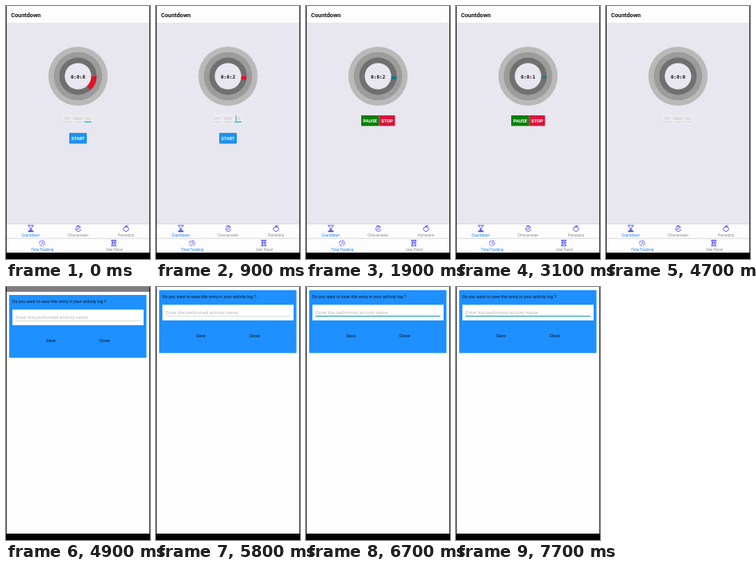
An HTML page that plays this animation: 180 px wide and 317 px high, repeating every 8000 ms.

```html
<!DOCTYPE html>
<html lang="en">
<head>
<meta charset="utf-8">
<title>Countdown</title>
<style>
  html, body { margin: 0; width: 100%; height: 100%; overflow: hidden; background: #000; }
  svg { display: block; width: 100vw; height: 100vh; font-family: Roboto, sans-serif; }
  .mid { text-anchor: middle; }
  .tab { font-size: 4.45px; text-anchor: middle; fill: #8c8c90; }
  .on { fill: #1f7cf0; }
  .btn { font-weight: 700; fill: #fff; text-anchor: middle; }
  .icon { fill: none; stroke: #3d3de6; stroke-width: .8; stroke-linecap: round; }
  .hint { font-size: 5.6px; fill: #c6c4ca; text-anchor: middle; }
  .digits { font: 700 6px "DejaVu Sans Mono", monospace; text-anchor: middle; fill: #111; }
</style>
</head>
<body>
<svg viewBox="0 0 180 317" preserveAspectRatio="none">
  <rect width="180" height="309" fill="#e8e6ee"/>
  <rect width="180" height="21" fill="#fdfdfd"/>
  <text x="6.2" y="13.7" font-size="7.3" font-weight="700" fill="#151515">Countdown</text>

  <circle cx="90" cy="88" r="37" fill="#b9b9b9"/>
  <circle cx="90" cy="88" r="30.3" fill="#9c9c9c"/>
  <circle cx="90" cy="88" r="23.4" fill="#707070"/>
  <circle cx="90" cy="88" r="16.6" fill="#e8e6ee"/>
  <path id="arc" fill="none" stroke-width="6.6"/>
  <text id="digits" class="digits" x="90" y="90.8"></text>

  <g id="fields">
    <path d="M71 135h12v13h-12zM84 135h12v13h-12zM97 135h12v13h-12z" fill="#ecebef"/>
    <text class="hint" x="76.7" y="143">HH</text>
    <text class="hint" x="90" y="143">MM</text>
    <text class="hint" x="102.2" y="143">SS</text>
    <path d="M72.5 145.3h9M85.500 145.3h9M98 145.3h9" stroke="#cbc9cf" stroke-width=".8"/>
    <g id="focus" stroke="#25a9b8">
      <path d="M98 145.3h9" stroke-width="1.1"/>
      <path id="caret" d="M100 136.500v8" stroke-width=".8"/>
    </g>
  </g>

  <g id="start">
    <rect x="79" y="159" width="22" height="13.500" rx="1" fill="#1e90f0"/>
    <text class="btn" x="90" y="167.900" font-size="5.500">START</text>
  </g>
  <g id="running">
    <rect x="69" y="137" width="22.300" height="13.300" fill="#068006"/>
    <rect x="91.300" y="137" width="20" height="13.300" fill="#dc143c"/>
    <text class="btn" x="80.200" y="145.800" font-size="5.700">PAUSE</text>
    <text class="btn" x="101.300" y="145.800" font-size="5.700">STOP</text>
  </g>

  <rect y="273" width="180" height="36" fill="#fdfdfd"/>
  <path d="M0 273h180M0 291.200h180" stroke="#c9c8ce" stroke-width=".7"/>
  <g class="icon">
    <path d="M27.500 275h7M27.500 282.700h7M28.500 275.300c0 2.500 2.500 2.500 2.500 3.600s-2.500 1.200-2.500 3.600M33.500 275.300c0 2.500-2.500 2.500-2.500 3.600s2.500 1.200 2.500 3.600"/>
    <path d="M29.300 282.300l1.700-2 1.700 2z" fill="#3d3de6"/>
    <path d="M93 277.300a3.200 3.200 0 1 0 .6 2.800M90.500 279.500l2.600-2.700M88.500 275.500h3M90.500 279.500h-1.500"/>
    <path d="M147.700 276.800a3.300 3.300 0 1 0 4.600 0M150 275v2.500M150 275.800l2.500-.6M148.500 277.500l1.500-1.300 1.500 1.300"/>
    <circle cx="45" cy="297" r="3.400" stroke-dasharray="3.600 1.700"/>
    <path d="M45 295.300v1.900h1.400"/>
    <path d="M131.700 293.500h6M132.500 293.500v5.500M137 293.500v5.500M131.700 300.500h6"/>
    <circle cx="134.700" cy="296" r="1.400"/>
    <path d="M132.700 300.300c0-3.200 4-3.200 4 0"/>
  </g>
  <text class="tab on" x="30.700" y="289">Countdown</text>
  <text class="tab" x="90" y="289">Chronometer</text>
  <text class="tab" x="150" y="289">Pomodoro</text>
  <text class="tab on" x="45.300" y="307.300">Time Tracking</text>
  <text class="tab" x="135.300" y="307.300">User Panel</text>

  <rect id="shade" width="180" height="309"/>
  <g id="sheet">
    <rect width="180" height="309" fill="#fefefe"/>
    <rect x="4" y="4" width="171.600" height="78.700" fill="#1e90ff"/>
    <text x="8" y="13.700" font-size="5.260" fill="#0b1626">Do you want to save this entry in your activity log ?:</text>
    <rect x="8" y="22.300" width="164" height="19.500" fill="#fefefe"/>
    <text x="12" y="34.200" font-size="6" fill="#b9b9bd">Enter the performed activity name</text>
    <path id="line" d="M12 36.500h156"/>
    <path id="cursor" d="M12.400 27.300v9" stroke="#1b9aaa" stroke-width=".9"/>
    <g class="mid" font-size="5.400" fill="#0b1626">
      <text x="56" y="62.700">Save</text>
      <text x="123.200" y="62.700">Close</text>
    </g>
  </g>

  <path d="M.5 0v309M179.500 0v309" stroke="#000" stroke-opacity=".75"/>
  <rect y="309" width="180" height="8"/>
</svg>
<script>
  const LOOP = 8000, STEP = 100;
  const el = id => document.getElementById(id);
  const show = (id, on) => el(id).setAttribute('visibility', on ? 'inherit' : 'hidden');
  const set = (id, attrs) => Object.entries(attrs).forEach(([k, v]) => el(id).setAttribute(k, v));
  const ramp = (t, a, b) => Math.min(1, Math.max(0, (t - a) / (b - a)));
  const mix = (a, b, k) => a.map((v, i) => Math.round(v + (b[i] - v) * k));

  // Seconds on the dial; each change eases over roughly half a second.
  const dial = t => 8 - 6 * ramp(t, 200, 900) - ramp(t, 2500, 3100) - ramp(t, 3500, 4000);
  const digit = t => t < 300 ? 8 : t < 2600 ? 2 : t < 3600 ? 1 : 0;

  function drawArc(t) {
    const r = 20, a = dial(t) * Math.PI / 30;
    const x = 90 + r * Math.cos(a), y = 88 + r * Math.sin(a);
    const rgb = mix([222, 20, 36], [22, 118, 138], ramp(t, 1600, 1900));
    set('arc', { d: `M${90 + r} 88A${r} ${r} 0 0 1 ${x} ${y}`, stroke: `rgb(${rgb})` });
    show('arc', a > .001);
  }

  function drawSheet(t) {
    const y = t < 4800 ? 309 : t < 4900 ? 201 : t < 5000 ? 6 : 0;
    const focused = t >= 6100;
    show('sheet', y < 309);
    set('sheet', { transform: `translate(0 ${y})` });
    set('shade', { 'fill-opacity': t < 4800 ? 0 : t < 4900 ? .21 : .5 });
    set('line', { stroke: focused ? '#1b9aaa' : '#c8c8cc', 'stroke-width': focused ? 1 : .6 });
    show('cursor', focused && (t < 6700 || (t >= 7200 && t < 7700)));
  }

  function draw(t) {
    const running = t >= 1700 && t < 3600;
    el('digits').textContent = `0:0:${digit(t)}`;
    drawArc(t);
    show('fields', !running);
    show('focus', t < 1700);
    show('caret', t >= 900 && t < 1400);
    show('start', t < 1700);
    show('running', running);
    drawSheet(t);
  }

  const t0 = performance.now();
  function tick() {
    const t = (performance.now() - t0) % LOOP;
    draw(Math.floor(t / STEP) * STEP);
    requestAnimationFrame(tick);
  }
  tick();
</script>
</body>
</html>
```
